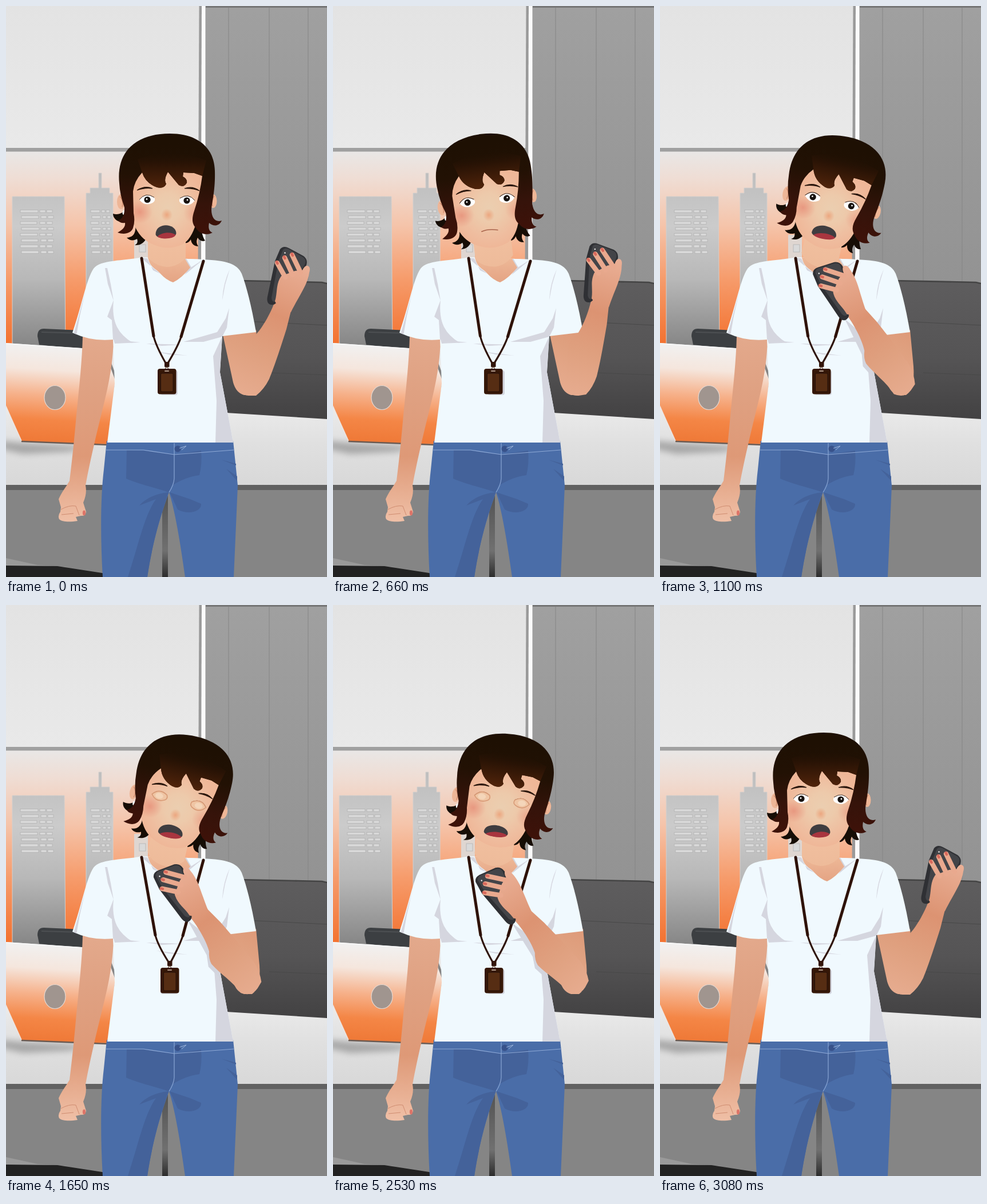
Recreate the animation shown at these times as an HTML page. Size 561 px wide and 998 px high, loop 3300 ms.

```html
<!DOCTYPE html>
<html lang="en">
<head>
<meta charset="utf-8">
<title>Phone call</title>
<style>
html, body { margin: 0; width: 100%; height: 100%; overflow: hidden; background: #e9e9e9; }
svg { display: block; width: 100%; height: 100%; }
</style>
</head>
<body>
<svg viewBox="0 0 561 998">
<defs id="defs">
  <filter id="soft" x="-50%" y="-50%" width="200%" height="200%"><feGaussianBlur stdDeviation="6"/></filter>
  <clipPath id="shirtClip"><path d="M238 439C205 446 165 443 153 459C141 476 132 525 116 571Q150 587 187 583L190 660 177 763H397L374 640 378 577 437 570C430 530 422 495 412 468C404 450 385 445 345 443Z"/></clipPath>
</defs>

<!-- room -->
<rect width="338" height="250" fill="url(#pane)"/>
<rect y="252" width="342" height="345" fill="url(#sky)"/>
<g fill="url(#tower)" stroke="#d3cfcd" stroke-width="1">
  <path d="M11 333H102L104 600H11Z"/>
  <path d="M140 327H147V318H162V292H167V318H181V327H187V600H140Z"/>
</g>
<g id="windows" fill="#d9d9d9" stroke="#b2b2b2" stroke-width=".8">
  <rect x="224" y="400" width="24" height="45" fill="#dfd6d1" stroke="none"/>
  <rect x="233" y="417" width="11" height="13"/>
</g>
<rect y="248" width="338" height="6.500" fill="#a0a0a0"/>
<path d="M337.500 0H342L341 470H335.500Z" fill="#9a9a9a"/>
<path d="M342 0H349V470H341Z" fill="#fbfbfb"/>
<rect x="348.500" width="213" height="500" fill="url(#wall)"/>
<path d="M349 1.500H561" stroke="#777" stroke-width="3"/>
<path d="M389 3V482M460 3V482M528 3V482" stroke="#858585" stroke-width="1"/>
<path d="M360 482L408 480 552 483 561 485V730H360Z" fill="url(#sofa)"/>
<path d="M408 480L552 483 561 485" fill="none" stroke="#444" stroke-width="2.500"/>
<path d="M420 551L561 558M460 641L561 645" stroke="#484848" stroke-width="1"/>

<!-- desk -->
<path d="M0 660L190 690 385 711 561 722V838H0Z" fill="url(#desk)"/>
<path d="M55 577Q55 564 66 564L132 567 150 602 58 592Z" fill="#3c3f42"/>
<path d="M62 570L132 572" stroke="#4d5053" stroke-width="2"/>
<path d="M-10 760L30 764 150 770 110 779 30 783-10 774Z" fill="#777" opacity=".55" filter="url(#soft)"/>
<path d="M0 589L160 600 182 623 194 657 181 766 27 761 0 698Z" fill="url(#laptop)"/>
<path d="M0 590L133 599" stroke="#f6f6f6" stroke-width="2"/>
<path d="M179 616L193 654 190 680" fill="none" stroke="#858585" stroke-width="4"/>
<path d="M0 700L27 760" stroke="#efe6e1" stroke-width="1.500"/>
<path d="M27 761L178 767" stroke="#6a5a52" stroke-width="2.500"/>
<ellipse cx="85.500" cy="684.500" rx="18.500" ry="21" fill="#a0958f" stroke="#e3d8d2" stroke-width="1.200"/>
<rect y="837" width="561" height="161" fill="#858585"/>
<rect y="837" width="561" height="9" fill="#616161"/>
<rect x="273" y="846" width="10" height="152" fill="url(#post)"/>
<path d="M0 965L55 977 110 981H0Z" fill="#9a9a9a"/>
<path d="M0 978L90 979 168 991 210 998H0Z" fill="#222"/>

<!-- jeans -->
<path d="M176 760H397L405 838 398 998H313C305 940 295 880 285 850C274 880 257 930 247 998H169C165 930 165 860 171 810Z" fill="#4a6da8"/>
<g fill="#44629a">
  <path d="M211 776L240 777 293 784V830L284 850C262 842 232 836 210 826Z"/>
  <path d="M294 784L341 777Q343 800 338 820C322 822 306 828 290 838L294 828Z"/>
  <path d="M284 850C262 852 245 860 233 873L262 862C242 890 232 940 213 998H247C257 930 274 880 284 850Z"/>
  <path d="M286 850L322 862 341 870C342 884 318 890 300 880Z"/>
  <path d="M376 793L402 800V803ZM385 809L404 822V830Z"/>
</g>
<path d="M175 776H240L294 784 398 776M294 764V826Q293 838 285 850" fill="none" stroke="#8ea9d6" stroke-width="1.100"/>
<circle cx="300" cy="774" r="5.500" fill="#38528a"/>
<path d="M303 773L315 769 307 776" fill="none" stroke="#9db5dc" stroke-width="1"/>

<!-- hanging arm -->
<path d="M134 578L188 580C187 630 178 668 167 712C157 752 146 800 139 838Q142 852 135 868L140 884Q139 892 131 891L122 893 125 900C112 902 98 902 93 897Q90 891 95 884L96 876 92 862C97 850 104 842 111 830C116 790 120 750 123 715C128 665 133 620 134 578Z" fill="url(#armL)"/>
<path d="M96 880Q110 872 122 874M97 889L118 887M122 874L128 890" fill="none" stroke="#cf8c70" stroke-width="1"/>
<ellipse cx="136.500" cy="886" rx="2.600" ry="4.500" fill="#dd7468"/>

<!-- raised upper arm, shirt -->
<path d="M378 570L437 566 443 630Q446 668 430 680H416Q402 676 397 658Z" fill="url(#armR)"/>
<g clip-path="url(#shirtClip)">
  <rect x="110" y="430" width="335" height="340" fill="#f0f9fe"/>
  <g fill="#d5d6df">
    <path d="M173 458L178 486 188 515 183 486 177 458Z"/>
    <path d="M143 484L118 574 123 576Q130 530 143 484Z"/>
    <path d="M188 514L177 543 185 549 187 583 222 589Q202 577 194 561Q185 543 188 514Z"/>
    <path d="M188 583L235 588 190 590Z"/>
    <path d="M391 460Q379 486 378 514L383 487ZM390 528L384 546 369 570 310 587 345 587 378 578 386 562Z"/>
    <path d="M378 577L362 612 368 690 366 763H400L374 640Z"/>
    <path d="M245 590L308 592 272 594ZM262 604L317 611 284 609Z"/>
    <path d="M236 440L247 441 257 462 270 468 250 452ZM345 443L330 444 312 470Z"/>
  </g>
  <path d="M247 436C252 460 262 458 270 468Q280 479 292 483Q307 476 323 456L314 436Z" fill="url(#neck)"/>
  <path d="M314 440L345 443 323 457Z" fill="#f0f9fe"/>
  <path d="M314 442L323 457" stroke="#d5d6df" stroke-width="2"/>
  <g id="shade"><path d="M463 515L428 575 412 588 392 668 418 689 442 679Z" fill="#d3d5de"/></g>
</g>

<!-- lanyard -->
<rect x="270" y="637" width="30" height="43" rx="4" fill="#d3d5de"/>
<g fill="none" stroke="#2e1207" stroke-linecap="round" stroke-linejoin="round">
  <path id="straps" stroke-width="5"/>
  <path id="loop" stroke-width="3.200"/>
</g>
<g id="badge">
  <rect x="277" y="622" width="8.500" height="9" rx="1" fill="#32150a"/>
  <circle cx="281" cy="634" r="2.500" fill="none" stroke="#806657" stroke-width="1.300"/>
  <rect x="265" y="634" width="32.500" height="44.500" rx="4" fill="#351707"/>
  <rect x="270.500" y="642" width="21.500" height="32" rx="2" fill="#562d13" stroke="#25100a" stroke-width="1"/>
  <rect x="277" y="637" width="8" height="2" rx="1" fill="#b09a8c"/>
</g>

<!-- head -->
<g id="head">
  <g fill="#160d05">
    <path d="M210 352C206 362 196 366 187 363C187 374 200 381 211 375Z"/>
    <path d="M226 380C228 398 222 404 211 405C217 411 224 410 229 407C231 413 229 416 225 418C235 419 242 413 245 406L249 411 256 380Z"/>
    <path d="M312 380L315 404 309 415C316 415 320 413 323 408C324 416 329 420 336 420C332 414 333 409 335 405C339 411 344 412 348 410C344 404 341 396 342 380Z"/>
  </g>
  <g fill="#eeb697">
    <ellipse cx="201" cy="342" rx="7" ry="13"/>
    <ellipse cx="362" cy="341" rx="6.500" ry="12"/>
  </g>
  <path d="M199 333Q206 340 203 351M364 332Q358 340 361 350" fill="none" stroke="#cf8a6d" stroke-width="1.300"/>
  <ellipse cx="206" cy="361" rx="2.500" ry="4" fill="#f4f7fa"/>
  <path d="M248 400H314V440Q300 456 281 456Q258 454 248 438Z" fill="url(#neckTop)"/>
  <path d="M216 282H350L332 380Q324 408 308 417Q282 428 258 417Q234 408 224 382Z" fill="url(#face)"/>
  <ellipse cx="234" cy="360" rx="22" ry="20" fill="url(#blush)"/>
  <ellipse cx="328" cy="362" rx="18" ry="18" fill="url(#blush)" opacity=".6"/>
  <ellipse cx="281" cy="365" rx="10" ry="11" fill="url(#nose)"/>
  <g id="eyes"></g>
  <path d="M229 322Q243 313 256 319Q243 317 229 322ZM312 319Q326 314 338 323Q326 318 312 319Z" fill="#2a160c" stroke="#2a160c" stroke-width="1.200"/>
  <g id="mouth">
    <path d="M-18 5C-18-16 17-15 18 3C18 14-17 15-18 5Z" fill="#3f3d40"/>
    <path d="M-15 9C-8 1 10 0 17 6C14 14-10 14-15 9Z" fill="#a8353f"/>
  </g>
  <path id="frown" d="M265 392Q277 388.500 293 393" fill="none" stroke="#a9644c" stroke-width="1.700" stroke-linecap="round"/>
  <path d="M198 310C192 252 230 223 286 223C338 223 364 250 365 288C366 322 360 342 359 356C359 370 366 379 377 375C373 385 362 386 355 379C353 388 355 394 361 396C350 402 338 398 332 388C324 380 325 370 329 358Q339 328 343 297L329 292 310 291 309 298Q317 302 316 309Q311 318 302 313L283 290Q275 304 280 311Q276 320 264 317Q244 310 238 291Q224 306 222 324L223 362Q226 376 222 388C218 398 206 400 195 396C204 391 209 386 208 379Q199 380 196 375Q208 370 207 352Q199 330 198 310Z" fill="url(#hair)"/>
  <path d="M230 268Q286 244 350 270L343 297 329 292 310 291 309 298Q317 302 316 309Q311 318 302 313L283 290Q275 304 280 311Q276 320 264 317Q244 310 238 291Z" fill="url(#fringe)"/>
</g>

<!-- raised forearm, hand, phone -->
<g id="fore">
  <path d="M471 513C462 540 446 565 436 575Q424 581 419 590C412 612 412 638 402 660Q406 680 424 681H437Q451 670 460 652C470 628 482 590 490 565L498 533Z" fill="url(#armR)"/>
  <g id="hand">
    <path d="M479 425Q485 418 494 423L520 437Q528 443 525 453L498 505 474 517Q468 525 460 521Q455 517 457 508L470 446Z" fill="#2f3034"/>
    <path d="M484 426Q489 421 496 426L519 439Q526 444 522 452L494 500 474 515Q465 521 464 510L476 446Z" fill="#434448"/>
    <circle cx="487.500" cy="431.500" r="1.300" fill="#e8e8e8"/>
    <path d="M470 516C475 500 471 487 481 472L505 463 518 462Q522 453 527 454Q533 456 530 466C527 488 511 508 498 535Q482 540 470 516Z" fill="url(#armR)"/>
    <g stroke="#e9a98e" stroke-width="8.500" stroke-linecap="round">
      <path d="M474 449L488 474M487 440L501 470M500 435L515 466"/>
    </g>
    <g stroke="#d9695c" stroke-width="4.500" stroke-linecap="round">
      <path d="M473 447L474.500 450M486 438L487.500 441M499.500 433L501 436"/>
    </g>
  </g>
</g>
</svg>

<script>
const $ = id => document.getElementById(id);

function addGradient(tag, id, place, stops) {
  const marks = stops.map(([at, color, alpha = 1]) =>
    `<stop offset="${at}" stop-color="${color}" stop-opacity="${alpha}"/>`).join('');
  $('defs').insertAdjacentHTML('beforeend', `<${tag} id="${id}" ${place}>${marks}</${tag}>`);
}
function linear(id, x1, y1, x2, y2, ...stops) {
  addGradient('linearGradient', id,
    `gradientUnits="userSpaceOnUse" x1="${x1}" y1="${y1}" x2="${x2}" y2="${y2}"`, stops);
}
const radial = (id, ...stops) => addGradient('radialGradient', id, '', stops);

linear('pane', 0, 0, 0, 250, [0, '#e3e3e3'], [1, '#e9e9e9']);
linear('sky', 0, 254, 0, 595, [0, '#e9e7e6'], [.14, '#efddd4'], [.38, '#f5c4aa'], [.65, '#f69c6c'], [1, '#f3702d']);
linear('tower', 0, 292, 0, 600, [0, '#bdbdbd'], [.3, '#cbcbcb'], [.6, '#b8b8b8'], [1, '#838383']);
linear('wall', 0, 0, 0, 480, [0, '#a0a0a0'], [1, '#939393']);
linear('sofa', 0, 480, 0, 725, [0, '#5e5d5e'], [.55, '#555455'], [1, '#424142']);
linear('desk', 0, 690, 0, 838, [0, '#ededed'], [.5, '#e0e0e0'], [1, '#d8d8d8']);
linear('laptop', 40, 590, 30, 765, [0, '#f1f1f1'], [.25, '#f5e6dd'], [.5, '#f6b28c'], [.75, '#f48646'], [1, '#ee7735']);
linear('post', 0, 846, 0, 998, [0, '#515151'], [.7, '#707070'], [1, '#2c2c2c']);
linear('armL', 0, 578, 0, 900, [0, '#e3a98c'], [.3, '#dfa182'], [.65, '#de9977'], [1, '#efbfa6']);
linear('armR', 415, 675, 510, 450, [0, '#e6ab8e'], [.3, '#dfa07f'], [.6, '#dc9372'], [1, '#eaaf95']);
linear('neck', 0, 430, 0, 485, [0, '#f0bd9c'], [1, '#e4a383']);
linear('neckTop', 0, 400, 0, 456, [0, '#f1c0a0'], [1, '#eebb9a']);
radial('face', [0, '#ebceb0'], [.35, '#edcaab'], [.75, '#efbd9f'], [1, '#efb798']);
linear('hair', 0, 240, 0, 392, [0, '#1e1003'], [.35, '#221104'], [.7, '#35130a'], [1, '#3d1209']);
linear('fringe', 0, 256, 0, 318, [0, '#211104', 0], [.3, '#291305'], [1, '#51240b']);
radial('blush', [0, '#e3806c', .6], [1, '#e3806c', 0]);
radial('nose', [0, '#ec9a70', .75], [1, '#ec9a70', 0]);

function windowRows(x, wide, small) {
  for (let i = 0; i < 8; i++) {
    const y = 356.5 + i * 10.2, left = x + i % 2 * 2;
    const parts = [[left, wide - i % 3], [left + wide + 3, small], [left + wide + small + 5, small]];
    for (const [px, w] of parts)
      $('windows').insertAdjacentHTML('beforeend', `<rect x="${px}" y="${y}" width="${w}" height="4.5"/>`);
  }
}
windowRows(25, 31, 10);
windowRows(148, 16, 6);

function addEye(x, y, side) {
  const almond = 'M-14 0Q-3 -14 12 -4Q15 2 10 5Q-4 13 -14 0Z';
  $('eyes').insertAdjacentHTML('beforeend', `<g transform="translate(${x} ${y}) scale(${side} 1)">
    <path d="${almond}" fill="#fff"/>
    <circle r="5.6" fill="#17120f"/><circle cx="-1" cy="-1" r="1.4" fill="#fff"/>
    <path d="M-14 0Q-3 -14 12 -4" fill="none" stroke="#3a241a" stroke-width="1"/>
    <g class="lid"><path d="${almond}" fill="#efc5a4" stroke="#d89a76" stroke-width="1.6"/>
    <ellipse cx="-1" cy="0" rx="7" ry="5" fill="#f6dac0" opacity=".75"/></g></g>`);
}
addEye(247, 338.5, 1);
addEye(316, 340, -1);
const lids = document.querySelectorAll('.lid');

// step, head angle, arm angle, badge swing, mouth width, mouth height, lid
const POSES = [
  [0, 0, 0, 0, 1, 1, 0],
  [2, -1, -.7, 0, 1, .7, 0],
  [3, -2, -1.4, 0, .9, 0, 0],
  [4, -3, -2.2, 0, 1, 0, 0],
  [6, -7.5, -8, -1, 1, 0, 0],
  [8, 4, -22, -3.5, 1.22, 1, 0],
  [10, 12, -56, 1, 1.2, 1, 0],
  [12, 7, -58, 3, 1, .6, 0],
  [14, 10, -59, 5, 1.1, .8, 0],
  [15, 13, -59, 5, 1.2, 1, 1],
  [16, 13, -59, 4, 1.2, 1, .5],
  [17, 13, -59, 3, 1.2, 1, 0],
  [21, 10.5, -61, 1, 1, .8, 0],
  [22, 9, -61.5, .5, 1.1, .8, .5],
  [23, 8.5, -62, 0, 1.17, .88, 1],
  [24, 7, -52, 0, 1.1, .8, 0],
  [26, 3, -18, 0, 1, .7, 0],
  [28, 0, 0, 0, 1, 1, 0]
];
const STEP = 110, LOOP = 3300;

function poseAt(k) {
  const i = Math.max(1, POSES.findIndex(p => p[0] >= k));
  const a = POSES[i - 1], b = POSES[i], u = (k - a[0]) / (b[0] - a[0]);
  return a.map((v, j) => v + (b[j] - v) * u);
}

const move = (id, value) => $(id).setAttribute('transform', value);

function draw(ms) {
  let k = Math.floor((ms % LOOP) / STEP + .001);
  if (k === 18) k = 17; // the pose holds for one extra step
  const [, head, arm, swing, wide, open, lid] = poseAt(Math.min(k, 28));
  const bend = Math.min(1, (arm / 56) ** 2);

  move('head', `rotate(${head} 279 432)`);
  const turn = `translate(${-20 * bend} ${8 * bend}) rotate(${arm} 425 640)`;
  move('fore', turn);
  move('shade', turn);
  $('shade').setAttribute('opacity', bend > .6 ? 1 : 0);
  move('hand', `rotate(${10 * bend} 484 525)`);

  move('badge', `translate(${swing} 0)`);
  const x = 281 + swing, left = 258 + swing * .6, right = 306 + swing * .6;
  $('straps').setAttribute('d', `M237 441L${left} 577M345 446L${right} 578`);
  $('loop').setAttribute('d', `M${left} 577Q${left + 4} 594 ${x - 2} 624M${right} 578Q${right - 5} 594 ${x + 2} 624`);

  const shut = open < .15;
  $('mouth').style.display = shut ? 'none' : '';
  $('frown').style.display = shut ? '' : 'none';
  move('mouth', `translate(279.5 394) scale(${wide} ${open})`);
  for (const el of lids) {
    el.style.display = lid > 0 ? '' : 'none';
    el.setAttribute('transform', `translate(0 ${-6 * (1 - lid)}) scale(1 ${Math.max(.01, lid)})`);
  }
}

const start = performance.now();
function tick() {
  draw(performance.now() - start);
  requestAnimationFrame(tick);
}
tick();
</script>
</body>
</html>
```
